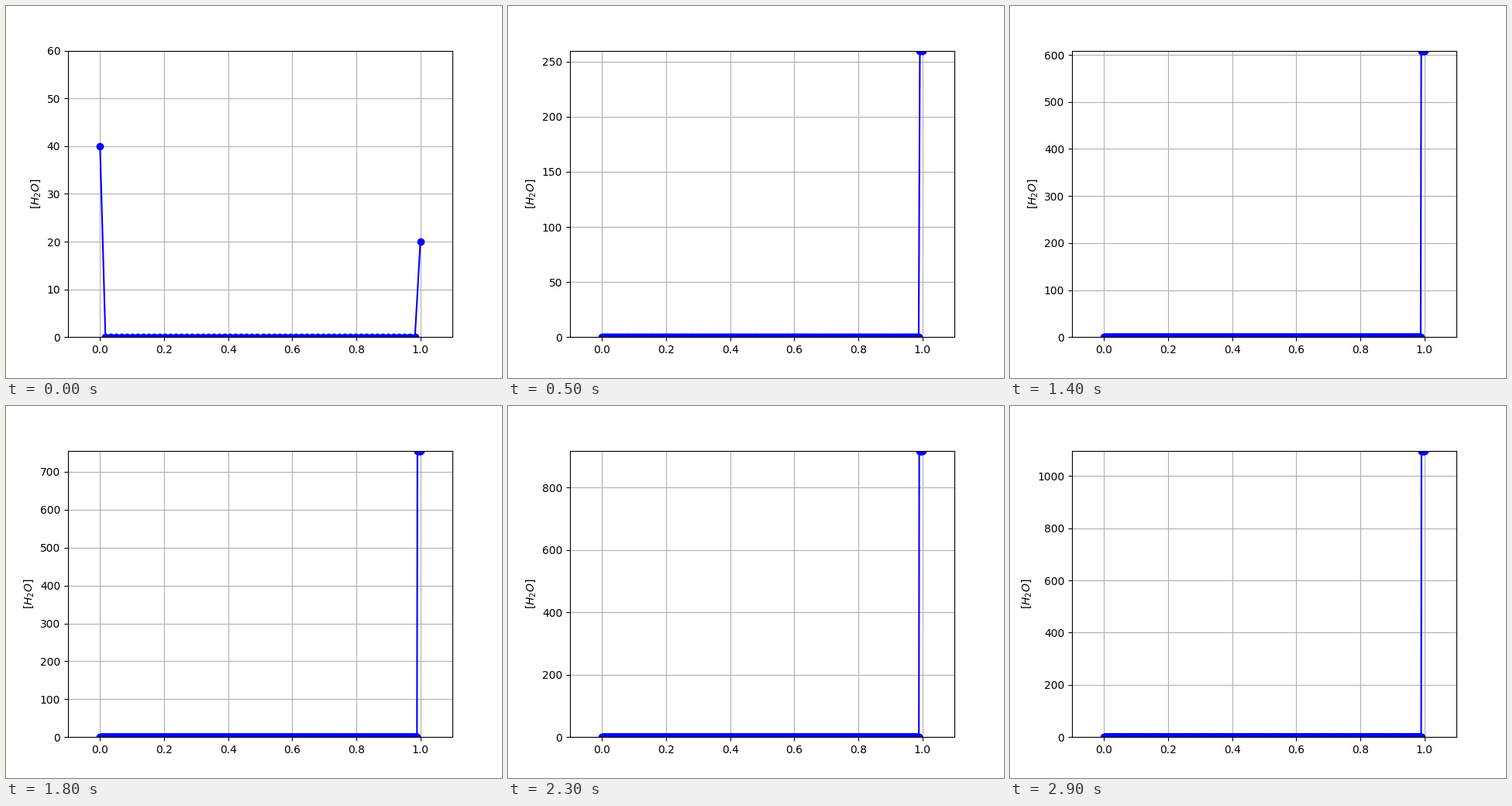
A matplotlib script for the animation above (3 s loop, 640 by 480 pixels).

```python
import numpy as np
import matplotlib.pyplot as plt
from matplotlib.animation import FuncAnimation

FRAMES = 30
INTERVAL = 100

# Particle count over time: steady inflow that slowly weakens
KEY_STEPS = [0, 5, 10, 14, 18, 23, 29]
KEY_COUNTS = [60, 260, 456, 609, 756, 918, 1097]

fig, ax = plt.subplots(figsize=(6.4, 4.8), dpi=100)
line, = ax.plot([], [], "bo-")
ax.set_xlim(-0.1, 1.1)
ax.set_ylabel(r"$[H_2O]$")
ax.grid(True)


def profile(step):
    """Return positions, concentrations and the total particle count."""
    count = int(round(np.interp(step, KEY_STEPS, KEY_COUNTS)))
    x = np.linspace(0, 1, count)
    if step == 0:
        y = np.zeros(count)
        y[0], y[-1] = 40, 20
    else:
        # Everything has gathered in the last hundredth
        y = np.where(x > 0.99, count, 0)
    return x, y, count


def update(step):
    x, y, count = profile(step)
    line.set_data(x, y)
    ax.set_ylim(0, count)
    return line,


anim = FuncAnimation(fig, update, frames=FRAMES, interval=INTERVAL,
                     init_func=lambda: update(0), repeat=True,
                     repeat_delay=0, blit=False)
plt.show()
```
